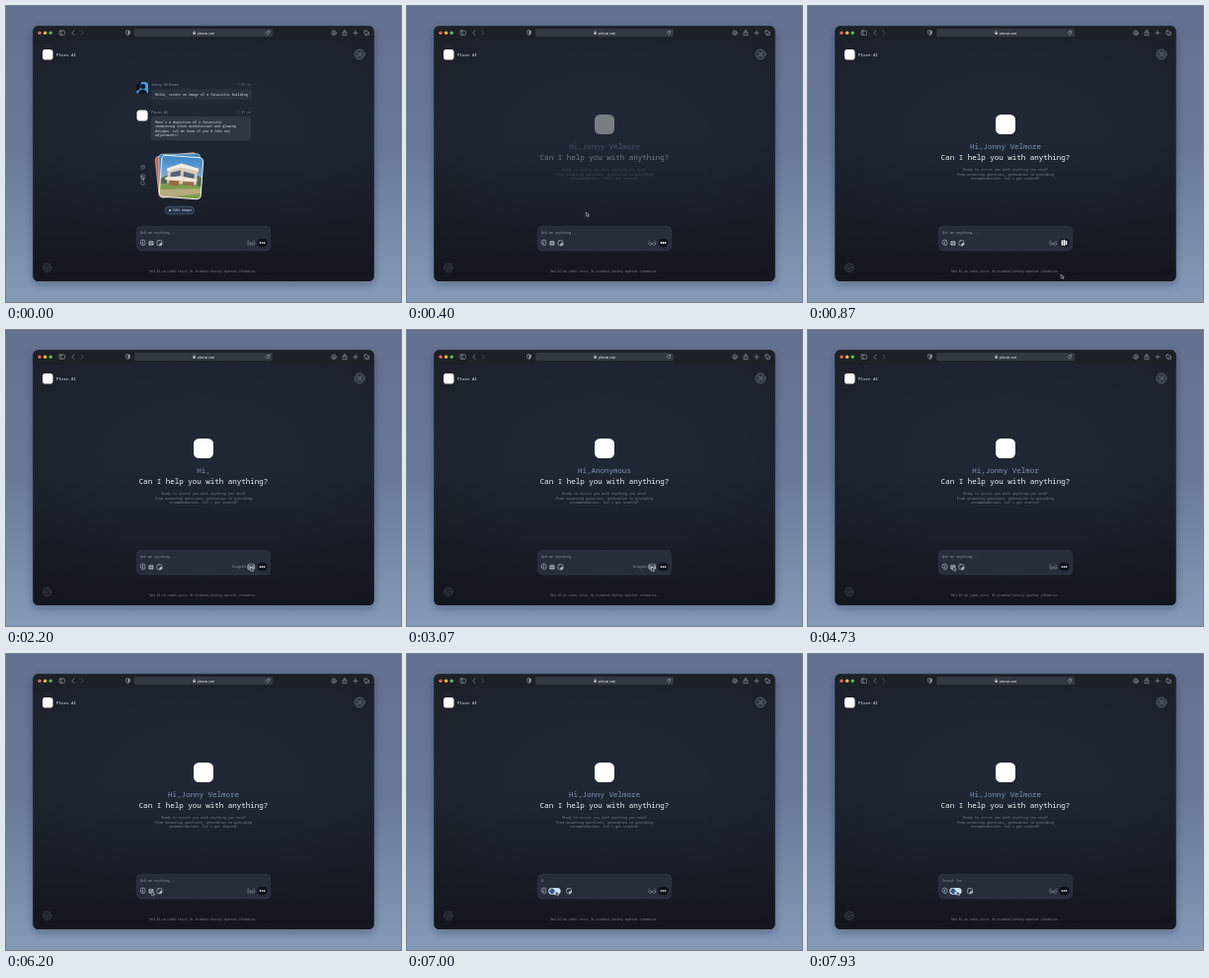
Write an HTML page that moves like this. It is 400 px wide and 300 px high and loops after 8 s.

```html
<!DOCTYPE html>
<html lang="en">
<head>
<meta charset="utf-8">
<title>Assistant</title>
<style>
html, body { margin: 0; width: 100%; height: 100%; overflow: hidden; background: #6c7f9c; }
svg { display: block; width: 100vw; height: 100vh; }
text { font-family: "Noto Sans Mono", "DejaVu Sans Mono", monospace; white-space: pre; }
.mid { text-anchor: middle; }
.line { fill: none; stroke-linecap: round; stroke-linejoin: round; }
.small { font-size: 3.33px; }
</style>
</head>
<body>
<svg viewBox="0 0 400 300" xmlns="http://www.w3.org/2000/svg">
  <defs>
    <linearGradient id="wall" x2="0" y2="1">
      <stop stop-color="#63708f"/><stop offset=".5" stop-color="#687a98"/><stop offset="1" stop-color="#849bb8"/>
    </linearGradient>
    <linearGradient id="page" x2="0" y2="1">
      <stop stop-color="#222834"/><stop offset=".45" stop-color="#202734"/><stop offset="1" stop-color="#13161d"/>
    </linearGradient>
    <radialGradient id="vignette" r=".72">
      <stop offset=".4" stop-color="#12161d" stop-opacity="0"/><stop offset="1" stop-color="#12161d" stop-opacity=".45"/>
    </radialGradient>
    <linearGradient id="sky" x2="0" y2="1">
      <stop stop-color="#3f86c6"/><stop offset="1" stop-color="#b4d4e8"/>
    </linearGradient>
    <filter id="shadow" x="-10%" y="-10%" width="120%" height="125%">
      <feDropShadow dx="0" dy="3" stdDeviation="4" flood-color="#1b2436" flood-opacity=".35"/>
    </filter>
    <clipPath id="window"><rect x="27.5" y="20.5" width="345" height="258.5" rx="5"/></clipPath>
    <clipPath id="card"><rect x="-21" y="-21" width="42" height="42" rx="4"/></clipPath>
    <clipPath id="avatar"><rect x="132" y="77" width="12" height="12" rx="3"/></clipPath>
  </defs>

  <rect width="400" height="300" fill="url(#wall)"/>
  <rect x="27.5" y="20.5" width="345" height="258.5" rx="5" fill="#171b22" filter="url(#shadow)"/>
  <g clip-path="url(#window)">
    <rect x="27" y="20" width="346" height="260" fill="url(#page)"/>
    <rect x="27" y="34" width="346" height="246" fill="url(#vignette)"/>
    <rect x="27" y="20" width="346" height="14.2" fill="#1c2127"/>
  </g>

  <!-- browser bar -->
  <circle cx="34" cy="27.2" r="1.7" fill="#ee6258"/>
  <circle cx="39.6" cy="27.2" r="1.7" fill="#f2bd3c"/>
  <circle cx="45.2" cy="27.2" r="1.7" fill="#58c14a"/>
  <rect x="130" y="23" width="140" height="8.3" rx="2" fill="#333941"/>
  <g class="line" stroke="#9ba1a9" stroke-width=".6">
    <rect x="54" y="25" width="5.4" height="4.4" rx=".9"/><path d="M56 25v4.4"/>
    <path d="M68.8 25l-2 2.2 2 2.2"/><path d="M76 25l2 2.2-2 2.2" stroke="#5f666f"/>
    <path d="M123.5 24.6l2 .8v2q-.3 1.6-2 2.4-1.700-.8-2-2.400v-2z"/>
    <path d="M266.600 26.200a1.700 1.700 0 1 0 .2 1.300M266.800 25v1.400h-1.400"/>
    <circle cx="332" cy="27.200" r="2.300"/><path d="M332 26v2.400m-.9-.8l.9.9.9-.9"/>
    <path d="M342 26.400h-1v3.300h4v-3.300h-1M343 28v-3.600m-1.100 1l1.100-1 1.100 1"/>
    <path d="M354 25v4.400M351.800 27.200h4.400"/>
    <rect x="362.800" y="25" width="3.400" height="3.400" rx=".7"/><path d="M364.200 29.700h2.600q.7 0 .7-.7v-2.600"/>
  </g>
  <path d="M123.500 24.800v4.800q1.600-.8 1.800-2.200v-2z" fill="#9ba1a9"/>
  <rect x="189.400" y="26.700" width="2.400" height="2" rx=".4" fill="#cfd3d8"/>
  <path class="line" d="M189.900 26.700v-.6a.7.7 0 0 1 1.400 0v.6" stroke="#cfd3d8" stroke-width=".4"/>
  <text x="193.800" y="28.500" style="font:500 3.100px Inter,sans-serif" fill="#e4e7eb">plornai.com</text>

  <!-- page frame -->
  <rect x="37" y="44" width="10.500" height="10.500" rx="2.800" fill="#fff"/>
  <text x="51" y="50.900" font-size="4.200" fill="#e1e5ec">Plorn AI</text>
  <g class="line" stroke="#8b929d" stroke-width=".5">
    <circle cx="358" cy="49" r="5" fill="#2a303b"/>
    <circle cx="358" cy="49" r="1.200"/>
    <path d="M355.800 47.800v-1h1M359.200 46.800h1v1M360.200 50.200v1h-1M356.800 51.200h-1v-1"/>
  </g>
  <g class="line" stroke="#4a515b" stroke-width=".5">
    <circle cx="41.800" cy="265.300" r="4.300" fill="#20252d"/>
    <path d="M40.200 265.600l1.200 1.100 2.100-2.400"/>
  </g>
  <text class="mid" x="199.500" y="269.800" font-size="2.550" fill="#747c88">Note AI can commit errors. We recommend checking important information.</text>

  <!-- conversation -->
  <g id="chat">
    <g clip-path="url(#avatar)">
      <rect x="132" y="77" width="12" height="12" fill="#4b9bd8"/>
      <path d="M132 77h5l-1 5-1 3-3 1z" fill="#0b1420"/>
      <circle cx="138.700" cy="81.500" r="2.500" fill="#0b1420"/>
      <path d="M133.500 90q.5-5 5-5.600 4.200.6 4.800 5.600z" fill="#0b1420"/>
    </g>
    <rect x="132.500" y="105.500" width="11" height="11" rx="3" fill="#fff"/>
    <g font-size="3.600" fill="#8992a1">
      <text x="147" y="80.900">Jonny Velmore</text>
      <text x="147" y="108.900">Plorn AI</text>
    </g>
    <g font-size="3.200" fill="#59616e" text-anchor="end">
      <text x="248" y="80.900">7:09 pm</text>
      <text x="248" y="108.900">7:09 pm</text>
    </g>
    <rect x="147" y="84.200" width="102" height="11" rx="3" fill="#2b323e"/>
    <rect x="147" y="111.800" width="101" height="24.500" rx="3" fill="#303845"/>
    <g class="small" fill="#dce1e9">
      <text x="151" y="90.900">Hello, create an image of a futuristic building</text>
      <text x="151" y="118.600">Here's a depiction of a futuristic</text>
      <text x="151" y="123.100">showcasing sleek architecture and glowing</text>
      <text x="151" y="127.600">designs. Let me know if you'd like any</text>
      <text x="151" y="132.100">adjustments!</text>
    </g>
    <g class="line" stroke="#858d99" stroke-width=".5">
      <rect x="136.700" y="162.500" width="2.800" height="2.800" rx=".6"/><path d="M137.700 161.600h2.700v2.700"/>
      <path d="M136.500 173v-1.600h1l1-1.500.5 1.500h1.400l-.5 2.600h-2.400z"/>
      <path d="M136.500 178.500v2h1l1 1.500.5-1.500h1.400l-.5-2.600h-2.400z"/>
    </g>
    <rect x="-21" y="-21" width="42" height="42" rx="4" fill="#c7614a" stroke="#dfc0ae" stroke-width=".7" transform="translate(174 171.500) rotate(-6)"/>
    <rect x="-21" y="-21" width="42" height="42" rx="4" fill="#3f84b5" stroke="#cfe0ec" stroke-width=".7" transform="translate(176 171) rotate(-1)"/>
    <g transform="translate(177.500 173.500) rotate(4)">
      <g clip-path="url(#card)">
        <rect x="-21" y="-21" width="42" height="42" fill="url(#sky)"/>
        <path d="M-21 3q8-7 14-3t14-1 14 1v8h-42z" fill="#526f4a"/>
        <path d="M-21 8h42v13h-42z" fill="#7d9c49"/>
        <path d="M-21 14l42-4v5l-30 6h-12z" fill="#b7aa7d"/>
        <path d="M-14-7l13-6 17 4v16h-30z" fill="#d8ccb9"/>
        <path d="M-15-8l14-6 18 4v3l-18-3-14 5z" fill="#f0ece3"/>
        <path d="M-11-4l10-3v6l-10 2zM2-6l11 2v5l-11-1z" fill="#546476"/>
        <path d="M-16 1l15-2 17 2v2.500h-32z" fill="#f1e8da"/>
        <path d="M-12 4h10v5h-10zM2 4h11v4h-11z" fill="#9a6b48"/>
      </g>
      <rect x="-21" y="-21" width="42" height="42" rx="4" fill="none" stroke="#eef3f7" stroke-width="1"/>
    </g>
    <rect x="161" y="203.300" width="29.500" height="7.600" rx="3.800" fill="#273345" stroke="#536983" stroke-width=".6"/>
    <path d="M165.300 205.800l2.300 1.300-2.300 1.300z" fill="#e7eefb"/>
    <text x="169.200" y="208.200" font-size="2.900" fill="#e7eefb">Edit images</text>
  </g>

  <!-- welcome -->
  <g id="home">
    <rect x="190" y="110" width="20" height="20" rx="5.500" fill="#fff"/>
    <text id="greeting" class="mid" x="200" y="144.900" font-size="7.500" fill="#8192b8"></text>
    <text class="mid" x="200" y="155.500" font-size="7.530" fill="#f5f7fa">Can I help you with anything?</text>
    <g class="small mid" fill="#78818f">
      <text x="200" y="167.300">Ready to assist you with anything you need?</text>
      <text x="200" y="171.700">From answering questions, generation to providing</text>
      <text x="200" y="176.100">recommendations. Let's get started!</text>
    </g>
  </g>

  <!-- prompt box -->
  <rect x="132.300" y="223.300" width="135.400" height="24.600" rx="4.500" fill="#272e3a" stroke="#343d4b" stroke-width=".6"/>
  <text id="prompt" class="small" x="136" y="231.300" fill="#8c95a3"></text>
  <g class="line" stroke="#b7bec9" stroke-width=".65">
    <path d="M136.200 240.500v-1.200a2.300 2.300 0 0 1 4.600 0v1.300a2 2 0 0 1-4 0M138.600 238.800v2.200"/>
    <g id="picture">
      <rect x="152.900" y="237.700" width="5" height="5" rx="1.400"/>
      <path d="M155.600 242.700v-1q0-1.200 1.200-1.200h1.100v.8l-1.400 1.400z" fill="#b7bec9"/>
    </g>
  </g>
  <rect id="pill" y="236.900" height="6.800" rx="3.400" x="143.200" fill="#cfe0f3"/>
  <g id="globe">
    <circle cx="146.900" cy="240.300" r="2.650"/>
    <path class="line" d="M144.400 240.300h5M146.900 237.800v5" stroke="#272e3a" stroke-width=".55"/>
    <ellipse cx="146.900" cy="240.300" rx="1.200" ry="2.500" fill="none" stroke="#272e3a" stroke-width=".4"/>
  </g>
  <text id="label" x="229" y="241.300" font-size="2.650" fill="#98a1ae">Incognito</text>
  <circle id="halo" cx="248.200" cy="240" r="4" fill="#4a5361"/>
  <g id="mask" class="line" stroke-width=".6">
    <circle cx="246.200" cy="241" r="1.400"/><circle cx="250.200" cy="241" r="1.400"/>
    <path d="M247.600 240.800q.6-.4 1.200 0M244.800 239l.7-1.300M251.600 239l-.7-1.300"/>
  </g>
  <rect x="254.300" y="235.800" width="10.400" height="8.400" rx="4.200" fill="#0e1218"/>
  <g id="bars" fill="#f1f4f8"></g>

  <path id="cursor" d="M0 0l.2 4 1-.9.8 1.500.8-.4-.8-1.500 1.400-.2z" fill="#15181d" stroke="#eef1f5" stroke-width=".45"/>
</svg>
<script>
const LOOP = 8000, ERASE = 44, TYPE = 66.7;
const el = id => document.getElementById(id);
const clamp = v => Math.max(0, Math.min(1, v));
const smooth = (t, from, to) => {
  const p = clamp((t - from) / (to - from));
  return p * p * (3 - 2 * p);
};

// [text, typing starts, erasing starts]
const names = [["Jonny Velmore", -2000, 1600], ["Anonymous", 2520, 3520], ["Jonny Velmore", 3985, LOOP]];
const prompts = [["Ask me anything...", -2000, 6220], ["Search for...", 7310, LOOP]];

// [time, x, y]
const path = [
  [70, 137, 172], [870, 256, 272], [1450, 247.500, 240.500], [3560, 247.500, 240.500],
  [4450, 146.800, 239.800], [6200, 147.300, 240.600], [6900, 150.500, 240.600]
];

function typed(steps, t) {
  const [text, start, end] = steps.findLast(step => t >= step[1]);
  const shown = Math.min(text.length, Math.floor((t - start) / TYPE) + 1);
  const gone = t < end ? 0 : Math.floor((t - end) / ERASE);
  return text.slice(0, Math.max(0, shown - gone));
}

function pointAt(t) {
  const next = path.findIndex(p => p[0] > t);
  if (next === 0) return path[0].slice(1);
  if (next < 0) return path.at(-1).slice(1);
  const [t0, x0, y0] = path[next - 1], [t1, x1, y1] = path[next];
  const p = smooth(t, t0, t1);
  return [x0 + (x1 - x0) * p, y0 + (y1 - y0) * p];
}

const bars = [0, 1, 2].map(() => {
  const bar = document.createElementNS("http://www.w3.org/2000/svg", "rect");
  el("bars").append(bar);
  return bar;
});

function drawBars(t) {
  const tall = smooth(t, 350, 600) * (1 - smooth(t, 1450, 1750));
  bars.forEach((bar, i) => {
    const height = 1.700 + tall * [4, 4.600, 2.600][i];
    const size = { x: 256.600 + i * 2.050, y: 240 - height / 2, width: 1.650, height, rx: .7 };
    for (const key in size) bar.setAttribute(key, size[key]);
  });
}

function render(t) {
  el("chat").setAttribute("opacity", 1 - smooth(t, 110, 350));
  el("home").setAttribute("opacity", smooth(t, 250, 600));
  el("greeting").textContent = "Hi," + typed(names, t);
  el("prompt").textContent = typed(prompts, t);

  const hidden = smooth(t, 1600, 1900) * (1 - smooth(t, 3520, 3800));
  el("label").setAttribute("opacity", hidden);
  el("halo").setAttribute("opacity", hidden);
  el("mask").setAttribute("stroke", hidden > .5 ? "#e3e8ef" : "#858d9a");

  const open = smooth(t, 6250, 6600);
  el("pill").setAttribute("width", 7 + 5.400 * open);
  el("pill").setAttribute("opacity", open);
  el("globe").setAttribute("fill", open > .5 ? "#4f87cd" : "#cdd4de");
  el("picture").setAttribute("transform", `translate(${8.600 * open} 0)`);

  drawBars(t);
  el("cursor").setAttribute("transform", `translate(${pointAt(t)})`);
}

const begin = performance.now();
function frame() {
  render((performance.now() - begin) % LOOP);
  requestAnimationFrame(frame);
}
frame();
</script>
</body>
</html>
```
